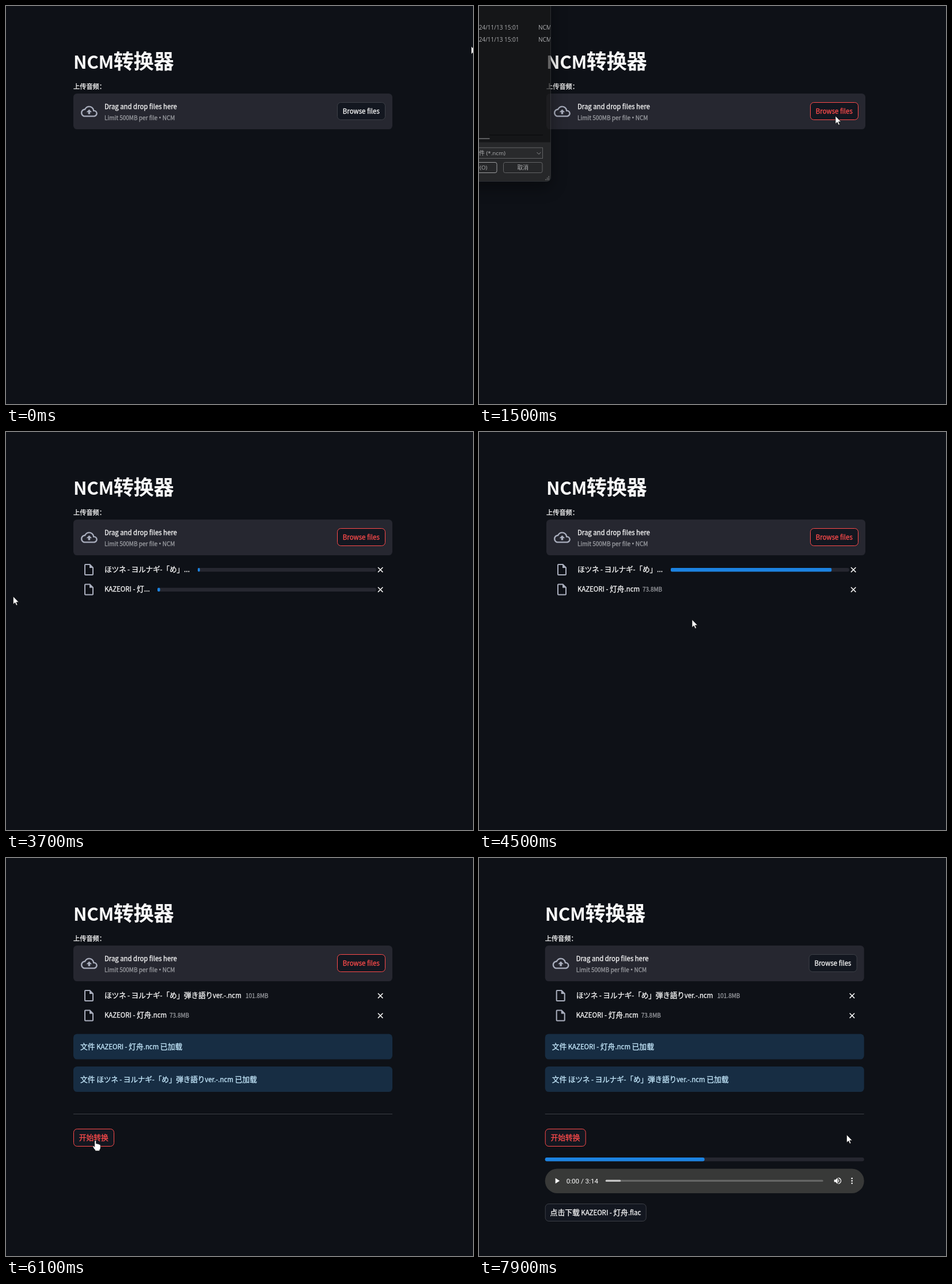
An HTML page for the animation above (8 s loop, 811x691 px).

```html
<!DOCTYPE html>
<html lang="zh-CN">
<head>
<meta charset="utf-8">
<title>NCM转换器</title>
<style>
html, body { margin: 0; width: 100%; height: 100%; overflow: hidden; background: #0e1117; }
svg { display: block; width: 811px; height: 691px; }
text { font-family: "Noto Sans CJK SC", "Noto Sans", sans-serif; white-space: pre; fill: currentColor; stroke: currentColor; stroke-width: 0.28px; }
.title { stroke: none; }
.sym { font-family: "Noto Sans", sans-serif; }
.win { font-family: "Open Sans", "Noto Sans CJK SC", sans-serif; stroke: none; }
.time { font-family: Roboto, sans-serif; stroke: none; }
</style>
</head>
<body>
<svg id="stage" viewBox="0 0 811 691"></svg>
<script>
const LOOP = 8000, STEP = 100;
const RED = '#ff4b4b', WHITE = '#fafafa', GREY = '#9b9da2', ICON = '#a9aebd', PANEL = '#262730', BLUE = '#1c83e1';
const BAND = 'KAZEORI - 灯舟', SINGER = 'ほツネ - ヨルナギ-「め」';
const stage = document.getElementById('stage');

function el(tag, attrs, parent) {
  const node = document.createElementNS('http://www.w3.org/2000/svg', tag);
  set(node, attrs);
  parent.appendChild(node);
  return node;
}
function set(node, attrs) {
  for (const k in attrs) node.setAttribute(k, attrs[k]);
}
const group = parent => el('g', {}, parent);
const rect = (p, x, y, width, height, rx, fill, more) => el('rect', { x, y, width, height, rx, fill, ...more }, p);
const path = (p, d, more) => el('path', { d, ...more }, p);
const show = (node, a) => set(node, { opacity: a });

// Latin runs are set smaller so that they sit well beside the CJK glyphs.
function text(p, x, y, str, size, color, more) {
  const node = el('text', { x, y, color, ...more }, p);
  for (const run of str.match(/[…•]+|[\x00-\u2000]+|[^\x00-\u2000…•]+/g)) {
    const sym = /[…•]/.test(run), latin = run.charCodeAt(0) < 0x2000;
    const span = el('tspan', { 'font-size': latin ? size * 0.894 : size }, node);
    if (sym) set(span, { class: 'sym' });
    if (/[ぁ-ヺ]/.test(run)) set(span, { 'letter-spacing': -0.3 });
    span.textContent = run;
  }
  return node;
}
function plain(p, x, y, str, size, cls, more) {
  const node = el('text', { x, y, class: cls, 'font-size': size, color: '#fff', ...more }, p);
  node.textContent = str;
}

function button(p, x, y, w, label) {
  const box = rect(p, x + 0.5, y + 0.5, w - 1, 30, 6, '#131720');
  const word = text(p, x + w / 2 - 0.2, y + 20.3, label, 12.8, WHITE, { 'text-anchor': 'middle' });
  return state => {
    set(box, { stroke: state ? RED : '#3d4047', fill: state === 2 ? RED : '#131720' });
    set(word, { color: state === 1 ? RED : WHITE });
  };
}

function fileRow(p, y, shortName, name, size, sizeX, barX) {
  const row = group(p);
  path(row, 'M14 2H6C4.9 2 4 2.9 4 4V20C4 21.1 4.9 22 6 22H18C19.1 22 20 21.1 20 20V8ZM6 20V4H13V9H18V20Z',
    { fill: ICON, transform: `translate(132 ${y - 12})` });
  path(row, `M646 ${y - 4}l8.4 8.4m0 -8.4l-8.4 8.4`, { stroke: WHITE, 'stroke-width': 1.5 });
  const busy = group(row), done = group(row), width = 643 - barX;
  text(busy, 171, y + 3.5, shortName, 12.8, WHITE);
  rect(busy, barX, y - 3, width, 6.4, 3.2, PANEL);
  const fill = rect(busy, barX, y - 3, 4, 6.4, 2, BLUE);
  text(done, 171, y + 3.5, name, 12.8, WHITE);
  text(done, sizeX, y + 3.5, size, 11.2, GREY);
  return (visible, part) => {
    show(row, visible ? 1 : 0);
    show(busy, part < 1 ? 1 : 0);
    show(done, part < 1 ? 0 : 1);
    set(fill, { width: width * Math.max(0, part) });
  };
}

function notice(p, y, label) {
  const g = group(p);
  rect(g, 117, y, 554, 44, 6.4, '#172d43');
  text(g, 129, y + 26.6, label, 12.8, '#c7ebff');
  return g;
}

// Page
rect(stage, 0, 0, 811, 691, 0, '#0e1117');
const page = group(stage);
text(page, 117, 108.6, 'NCM转换器', 35.2, WHITE, { class: 'title', 'font-weight': 700, 'letter-spacing': -0.4 });
text(page, 117, 143.5, '上传音频：', 11.2, WHITE);
rect(page, 117, 152, 554, 62, 6.4, PANEL);
path(page, 'M19.35 10.04A7.49 7.49 0 0 0 12 4C9.11 4 6.6 5.64 5.35 8.04A5.99 5.99 0 0 0 0 14c0 3.31 2.69 6 6 6h13c2.76 0 5-2.24 5-5 0-2.64-2.05-4.78-4.65-4.96zM19 18H6c-2.21 0-4-1.79-4-4 0-2.05 1.53-3.76 3.56-3.97l1.07-.11.5-.95A5.47 5.47 0 0 1 12 6c2.62 0 4.88 1.86 5.39 4.43l.3 1.5 1.53.11A2.98 2.98 0 0 1 22 15c0 1.65-1.35 3-3 3zM8 13h2.55v3h2.9v-3H16l-4-4z',
  { fill: ICON, transform: 'translate(130 168.6) scale(1.2)' });
text(page, 171, 178.5, 'Drag and drop files here', 12.7, WHITE);
text(page, 171, 197.6, 'Limit 500MB per file • NCM', 11.2, GREY);
const browse = button(page, 575, 167, 84, 'Browse files');

const song1 = fileRow(page, 239, SINGER + '…', SINGER + '弾き語りver.-.ncm', '101.8MB', 416, 333);
const song2 = fileRow(page, 273.5, BAND.slice(0, -1) + '…', BAND + '.ncm', '73.8MB', 284, 263);

const note1 = notice(page, 305.5, `文件 ${BAND}.ncm 已加载`);
const note2 = notice(page, 362, `文件 ${SINGER}弾き語りver.-.ncm 已加载`);
const actions = group(page);
rect(actions, 117, 444, 554, 1, 0, '#3d4046');
const start = button(actions, 117, 470, 71, '开始转换');

const progress = group(page);
rect(progress, 117, 520, 554, 6.4, 3.2, PANEL);
const done = rect(progress, 117, 520, 0, 6.4, 3.2, BLUE);

const player = group(page);
rect(player, 117, 539.5, 554, 42.5, 21.2, '#383938');
path(player, 'M135 555.8V565.2L142.4 560.5Z', { fill: '#fff' });
plain(player, 154, 564.5, '0:00 / 3:14', 11.6, 'time');
rect(player, 222, 558.8, 378, 3.2, 1.6, '#656665');
rect(player, 222, 558.8, 26.5, 3.2, 1.6, '#c6c6c6');
path(player, 'M619 558.5h2.6l3.4-3.4v10.8l-3.4-3.4h-2.6z', { fill: '#fff' });
path(player, 'M626.3 558.2q1.8 2.3 0 4.6M626.3 555.4q4.6 1.2 4.6 5.1t-4.6 5.1', { fill: 'none', stroke: '#fff', 'stroke-width': 1.2 });
for (const y of [556.3, 560.5, 564.7]) el('circle', { cx: 650, cy: y, r: 1.3, fill: '#fff' }, player);

const download = group(page);
button(download, 117, 600, 176, `点击下载 ${BAND}.flac`)(0);

// File dialog
const dialog = group(stage);
dialog.style.filter = 'drop-shadow(0 10px 14px rgba(0,0,0,.6))';
rect(dialog, -300, -100, 424.5, 408.5, 7, '#323232', { stroke: '#45474b', 'stroke-width': 0.8 });
rect(dialog, -300, -90, 424, 330.5, 0, '#191919');
rect(dialog, 97, 0, 1, 4, 0, '#636363');
const picked = group(dialog);
rect(picked, -10, 31.5, 134, 18, 0, '#4d4d4d');
path(picked, 'M0 31.5H124M0 49.5H124', { stroke: '#a5a5a5' });
rect(picked, -10, 53, 134, 18.5, 0, '#626262');
const list = el('svg', { x: 0, y: 0, width: 124, height: 240 }, dialog);
list.style.cssText = 'width:124px;height:240px';
for (const y of [44.5, 66.2]) {
  plain(list, 69.5, y, '2024/11/13 15:01', 10, 'win', { 'text-anchor': 'end' });
  plain(list, 103, y, 'NCM 文件', 10, 'win');
}
rect(dialog, 18, 227.5, 93, 1, 0, '#070707');
rect(dialog, 0, 233.5, 18.5, 1.6, 0, '#a0a0a0');
rect(dialog, -99.5, 250, 210, 18.5, 0, '#373737', { stroke: '#8d8d8d' });
plain(dialog, 46, 263, 'NCM 文件 (*.ncm)', 9.8, 'win', { 'text-anchor': 'end' });
path(dialog, 'M100.5 258l3.4 3.4 3.4 -3.4', { fill: 'none', stroke: '#ccc' });
const open = rect(dialog, -40, 275.5, 71, 18, 3, '#333', { stroke: '#e4e4e4' });
plain(dialog, 14.5, 287.5, '打开(O)', 9.8, 'win', { 'text-anchor': 'end' });
rect(dialog, 42.5, 275.5, 67.5, 18, 3, '#333', { stroke: '#8d8d8d' });
plain(dialog, 76.3, 287.5, '取消', 9.8, 'win', { 'text-anchor': 'middle' });
for (let i = 0; i < 3; i++)
  for (let j = 0; j <= i; j++) rect(dialog, 120.5 - 2.6 * j, 299.5 + 2.6 * i, 1.5, 1.5, 0, '#b5b5b5');

// Pointer
const pointer = group(stage);
const arrow = path(pointer, 'M0 0V13.6L3.2 10.7L5.4 15.6L7.5 14.7L5.4 9.9H9.6Z', { fill: '#fff', stroke: '#111', 'stroke-width': 0.7 });
const hand = path(pointer, 'M-1.6 1.2Q-1.5 0 -.3 0T1 1.2V5.6Q2.4 4.9 3.5 6Q4.9 5.5 5.9 6.7Q8.6 6.4 8.6 9V12.5Q8.6 15 7 16.4V18H-.6V16.5Q-2.6 14.8 -4.7 10.8Q-5 9.2 -3.7 9.3Q-2.7 9.6 -1.6 11.2Z',
  { fill: '#fff', stroke: '#111', 'stroke-width': 0.6 });

const trip = [
  [0, 808, 70], [100, 778, 104], [200, 738, 152], [300, 690, 196], [400, 655, 202], [500, 628, 192], [600, 617, 185],
  [800, 617, 185], [900, 617, 184], [1000, 617, 182], [1100, 617, 182], [1200, 618, 190], [1400, 618, 190], [1600, 620, 192],
  [1800, 620, 192], [1900, 430, 190], [2000, 208, 188], [2100, -40, 300], [2800, -40, 300], [2900, -4, 298], [3200, 12.5, 285.5],
  [3700, 12.5, 285.5], [4000, 130, 318], [4300, 310, 328], [4600, 400, 324.5], [5300, 400, 324.5], [5400, 388, 340],
  [5500, 340, 420], [5600, 265, 510], [5700, 215, 543], [5800, 184, 530], [5900, 166, 509], [6000, 158, 494], [6100, 155.5, 490.5],
  [6500, 155.5, 490.5], [6700, 190, 540], [7000, 330, 598], [7300, 500, 570], [7500, 580, 520], [7900, 638.5, 480.5]
];

function at(keys, t) {
  const i = keys.findIndex(k => k[0] > t);
  if (i < 0) return keys[keys.length - 1].slice(1);
  const a = keys[i - 1], b = keys[i], f = (t - a[0]) / (b[0] - a[0]);
  return a.slice(1).map((v, n) => v + (b[n + 1] - v) * f);
}
const ramp = (t, a, b) => Math.min(1, Math.max(0, (t - a) / (b - a)));

function draw(ms) {
  const t = Math.floor(ms / STEP) * STEP;
  const [x, y] = at(trip, t);
  set(pointer, { transform: `translate(${x} ${y})` });
  const overStart = t >= 6000 && t < 6700;
  show(arrow, overStart ? 0 : 1);
  show(hand, overStart ? 1 : 0);

  set(page, { transform: `translate(${t >= 7400 ? -2.3 : 0} 0)` });
  browse(t === 900 ? 2 : t >= 500 && t < 6400 ? 1 : 0);
  start(t >= 6400 && t < 6600 ? 2 : t >= 6000 ? 1 : 0);

  const shown = Math.min(ramp(t, 1300, 1600), 1 - ramp(t, 3300, 3500));
  set(dialog, { opacity: shown, transform: `translate(0 ${(shown - 1) * 12})` });
  show(picked, t >= 2400 ? 1 : 0);
  set(open, { fill: t >= 3100 ? '#454545' : '#333' });

  song1(t >= 3600, t < 3700 ? 0 : 0.012 + ramp(t, 3700, 4600));
  song2(t >= 3600, t < 3700 ? 0 : 0.012 + ramp(t, 3700, 4400));
  show(note1, ramp(t, 4700, 4900));
  show(note2, 0.76 * ramp(t, 4800, 4900) + 0.24 * ramp(t, 4900, 5100));
  show(actions, t >= 4800 ? 1 : 0);

  show(progress, ramp(t, 6500, 6800));
  set(done, { width: 277 * ramp(t, 7400, 7700) });
  show(player, ramp(t, 7400, 7600));
  show(download, ramp(t, 7500, 7700));
}

function tick(now) {
  draw(now % LOOP);
  requestAnimationFrame(tick);
}
draw(0);
requestAnimationFrame(tick);
</script>
</body>
</html>
```
